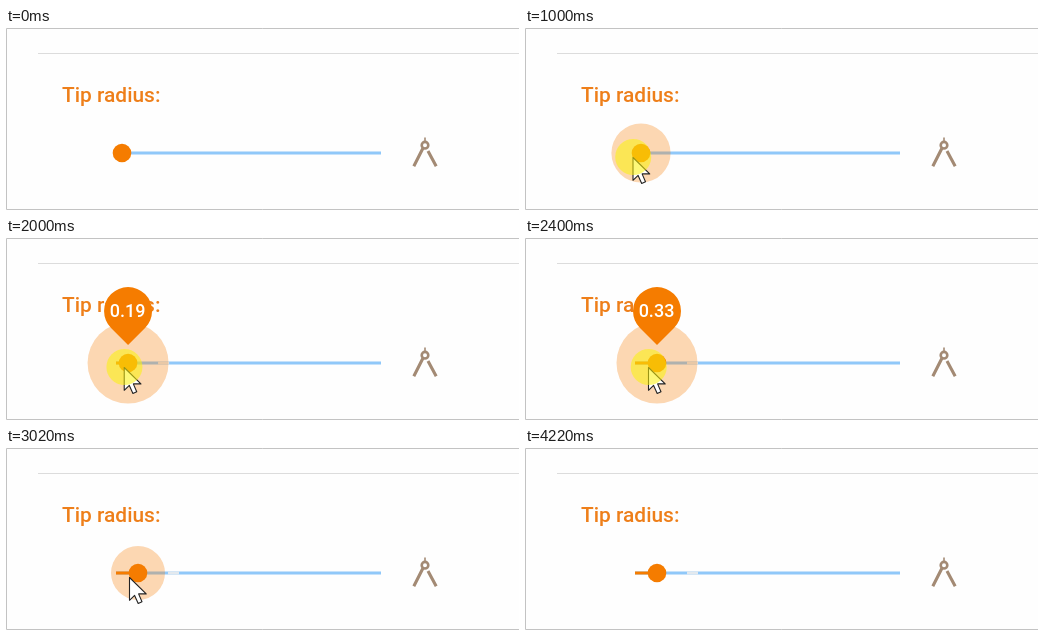
Animation of 513 by 182 pixels, one loop 5.04 s. Source, as an HTML page:

```html
<!DOCTYPE html>
<html lang="en">
<head>
<meta charset="utf-8">
<title>Tip radius slider</title>
<style>
  html, body { margin: 0; width: 100%; height: 100%; overflow: hidden; background: #fefefe; }
  svg { display: block; width: 100%; height: 100%; }
  text { font-family: Roboto, sans-serif; font-weight: 500; }
</style>
</head>
<body>
<svg viewBox="0 0 513 182">
  <rect width="513" height="182" fill="#fefefe"/>
  <path d="M513 .5H.5V181.5H513" fill="none" stroke="#c3c3c3"/>
  <path d="M32 25.5H513" stroke="#dcdcdc"/>
  <text x="56" y="74" font-size="20.9" fill="#ee7f1a">Tip radius:</text>

  <g fill="none" stroke="#a38a74">
    <circle cx="419" cy="117.2" r="3.3" stroke-width="2.6"/>
    <path d="M419 109.5V113.5" stroke-width="1.6"/>
    <path d="M416.8 120.5L407.8 138.2M422 123L430.2 138.2" stroke-width="3.1"/>
  </g>

  <g stroke-width="3">
    <path d="M110 125H375" stroke="#90c8f9"/>
    <path id="gap" stroke="#e3e9ee"/>
    <path id="filled" stroke="#f57c00"/>
  </g>
  <g id="handle">
    <circle id="halo" fill="#f57c00" fill-opacity=".3"/>
    <circle r="9.3" fill="#f57c00"/>
  </g>
  <g id="pin">
    <path d="M0 -18L-17 -35A24 24 0 1 1 17 -35Z" fill="#f57c00"/>
    <text id="value" x="-.5" y="-46" font-size="18" fill="#fff" text-anchor="middle"></text>
  </g>
  <g id="cursor">
    <path d="M.5 .5V23.3L5.6 18.4L9.2 26.4L13 24.8L9.6 16.9H17.2Z"
          fill="#fff" stroke="#222" stroke-width="1.1" stroke-linejoin="round"/>
    <circle id="glow" cx=".7" r="18" fill="#fcf20a" fill-opacity=".55"/>
  </g>
</svg>
<script>
const LOOP = 5040, TICK = 200, Y = 125, MIN_X = 116;
const APPEAR = 400, HOVER = 600, PRESS = 1000, DRAG = 1600, DROP = 2400,
      RELEASE = 2800, LEAVE = 3600, GONE = 4000;

const $ = id => document.getElementById(id);
const ramp = (t, a, b) => Math.min(1, Math.max(0, (t - a) / (b - a)));
const easeOut = p => 1 - (1 - p) ** 3;
const show = (el, on) => el.setAttribute("visibility", on ? "visible" : "hidden");
const move = (el, x, y, scale = 1) =>
  el.setAttribute("transform", `translate(${x} ${y}) scale(${scale})`);

// The picture changes in steps; the later ones come 20 ms late.
const quantize = t => Math.floor((t < 3000 ? t : t - 20) / TICK) * TICK;

function draw(time) {
  const t = quantize(time);
  const within = (a, b) => t >= a && t < b;
  const pressed = within(PRESS, RELEASE);
  const drag = ramp(t, DRAG, DROP);
  const x = MIN_X + 16 * drag ** 1.4;

  const grip = ramp(t, PRESS - 100, PRESS + 200) * (1 - ramp(t, RELEASE - 200, RELEASE + 100));
  move($("handle"), x, Y);
  $("halo").setAttribute("r", 27 + 13.5 * grip ** 1.5);
  show($("halo"), within(HOVER, GONE));
  $("filled").setAttribute("d", drag ? `M110 ${Y}H${x}` : "");
  $("gap").setAttribute("d", drag ? `M${x + 30} ${Y}h11` : "");

  const pin = pressed ? easeOut(ramp(t, PRESS, PRESS + 300)) : 0;
  show($("pin"), pin);
  move($("pin"), x, Y, pin);
  $("value").textContent = Math.round(10 + (x - MIN_X) * 1.45) / 100;

  const away = 1 - easeOut(ramp(t, APPEAR, APPEAR + 400));
  const leave = ramp(t, LEAVE, LEAVE + TICK);
  move($("cursor"),
    107.5 + 31.5 * away + 15.5 * drag ** 0.6 + 46 * leave,
    129 + 18 * away + 22 * leave);
  show($("cursor"), within(APPEAR, GONE));
  show($("glow"), pressed);
}

const start = performance.now();
function frame() {
  draw((performance.now() - start) % LOOP);
  requestAnimationFrame(frame);
}
frame();
</script>
</body>
</html>
```
